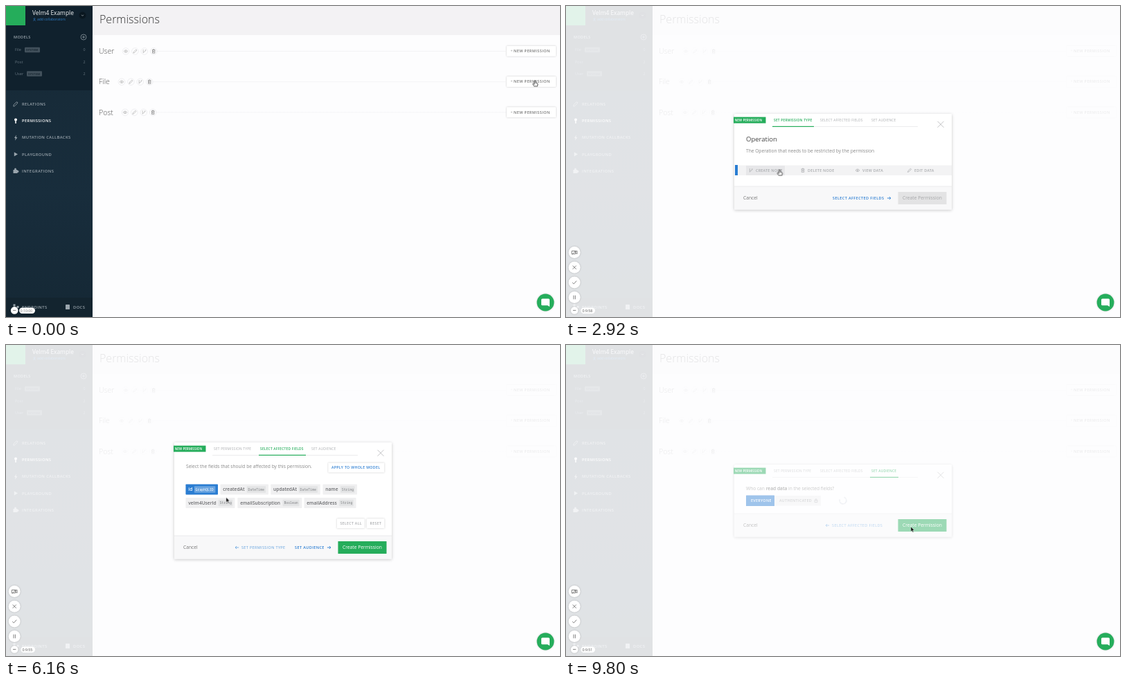
Write an HTML page that moves like this. It is 800 by 450 pixels and loops after 10000 ms.

```html
<!DOCTYPE html>
<html lang="en">
<head>
<meta charset="utf-8">
<title>Permissions</title>
<style>
html, body { margin: 0; width: 100%; height: 100%; overflow: hidden; background: #fdfdfe; }
svg { display: block; width: 800px; height: 450px; font-family: "Open Sans", "Noto Sans", sans-serif; }
text { white-space: pre; }
.b { font-weight: 600; }
.l { font-weight: 300; }
.m { font-family: "Noto Sans Mono", "DejaVu Sans Mono", monospace; }
.card { filter: drop-shadow(0 .6px 1px rgba(0, 0, 0, .22)); }
.modal { filter: drop-shadow(0 1px 2px rgba(0, 0, 0, .22)); }
.turn { transform-origin: 400px 225px; animation: turn 1s linear infinite; }
@keyframes turn { to { transform: rotate(360deg); } }
</style>
</head>
<body>
<svg id="stage" viewBox="0 0 800 450"></svg>
<script>
const GREEN = '#25ad5b', BLUE = '#2a7dd2', GREY = '#a9abae';
const rules = [];

// Keyframes over the ten second loop, times in ms.
function animate(id, steps, ease) {
  const body = steps.map(([t, p]) => `${t / 100}%{${p}}`).join('');
  rules.push(`@keyframes k-${id}{${body}}#${id}{animation:k-${id} 10s ${ease} infinite}`);
}
// Hard switches: on, off, on, ...
function show(id, ...times) {
  const steps = times.map((t, i) => [t, `opacity:${i % 2 ? 0 : 1}`]);
  if (times[0] > 0) steps.unshift([0, 'opacity:0']);
  animate(id, steps, 'step-end');
}
function fade(id, from, to, a, b) {
  animate(id, [[0, `opacity:${a}`], [from, `opacity:${a}`], [to, `opacity:${b}`], [10000, `opacity:${b}`]], 'linear');
}

// y is the middle of the capitals.
const text = (x, y, str, size, fill, cls = '', gap = 0) =>
  `<text x="${x}" y="${y + size * .357}" font-size="${size}" fill="${fill}" class="${cls}" letter-spacing="${gap}">${str}</text>`;
const rect = (x, y, w, h, fill, extra = '') =>
  `<rect x="${x}" y="${y}" width="${w}" height="${h}" fill="${fill}" ${extra}/>`;
const circle = (x, y, r, fill, extra = '') =>
  `<circle cx="${x}" cy="${y}" r="${r}" fill="${fill}" ${extra}/>`;
const line = (d, stroke, w = .7, extra = '') =>
  `<path d="${d}" fill="none" stroke="${stroke}" stroke-width="${w}" ${extra}/>`;
const group = (id, body) => `<g id="${id}">${body}</g>`;
const at = (x, y, body) => `<g transform="translate(${x} ${y})">${body}</g>`;

const icons = {
  eye: 'M-3 0Q0-3.6 3 0Q0 3.6-3 0ZM-.8 0a.8.8 0 1 0 1.6 0a.8.8 0 1 0-1.6 0',
  pen: 'M-2.6 2.6l.6-1.9L1.5-2.6l1.1 1.1L-.8 2Z',
  fork: 'M-1.6 2.7V-2.7M-1.6 1.5Q1.6 1 1.8-1.8M.8-1.8H2.8',
  bin: 'M-2.3-1.9H2.3M-.8-1.9v-.8h1.6v.8M-1.7-1.9V2.7H1.7V-1.9M-.6-.6v2M.6-.6v2',
  right: 'M-2.6 0H2.4M.4-2L2.4 0L.4 2',
  left: 'M2.6 0H-2.4M-.4-2L-2.4 0L-.4 2',
  link: 'M-3.2 3.2l.4-2.4L.8-2.8q1.6-1 2.2.8L-.4 1.8q-1 1.4-2.8 1.4Z',
  cam: 'M-3.8-2.2H1.4V2.2H-3.8ZM1.4-.4L3.8-2.2V2.2L1.4.4M-3.2 3L2.4-3',
  cross: 'M-2.6-2.6L2.6 2.6M2.6-2.6L-2.6 2.6',
  tick: 'M-3 .2L-.9 2.2L3-2.2',
  pause: 'M-1.2-2.8V2.8M1.2-2.8V2.8',
  minus: 'M-2.2 0H2.2',
  lock: 'M-1.9-.3H1.9V2.6H-1.9ZM-1.2-.3V-1.4q1.2-2.2 2.4 0v1.1'
};
const icon = (name, x, y, stroke, w = .7) => at(x, y, line(icons[name], stroke, w));

function sidebar() {
  const dim = '#9aa5ad', faint = '#65747f';
  let s = rect(0, 0, 125, 450, 'url(#side)') + rect(0, 0, 125, 122, '#10212d') + rect(0, 422, 125, 28, '#13242f');
  s += rect(0, 0, 28, 28, GREEN);
  s += text(38, 10, 'Velm4 Example', 8.4, '#f4f6f7') + text(45, 19.5, 'add collaborators', 5, '#2f7fc9');
  s += circle(41, 18.6, 1, 'none', 'stroke="#2f7fc9" stroke-width=".6"') + line('M39.2 21.5q1.8-2.4 3.6 0', '#2f7fc9', .6);
  s += circle(110.5, 13.5, 5, '#0a1720') + line('M109 12.8l1.5 1.5 1.5-1.5', '#b8c1c7', .7);
  s += text(11, 45, 'MODELS', 5.5, dim, 'b', .35);
  s += circle(112, 45, 4, 'none', `stroke="${dim}" stroke-width=".7"`) + line('M110 45h4M112 43v4', dim);
  [['File', 63.5, 27, 0], ['Post', 81, 0, 2], ['User', 98, 30, 2]].forEach(([name, y, tag, n]) => {
    s += text(13, y, name, 5.6, faint) + text(111.5, y, n, 5.4, faint);
    if (tag) s += rect(tag, y - 3.7, 22, 7.4, '#42515c', 'rx="1"') + text(tag + 2, y, 'SYSTEM', 4.3, '#11212c', 'b', .2);
  });
  ['RELATIONS', 'PERMISSIONS', 'MUTATION CALLBACKS', 'PLAYGROUND', 'INTEGRATIONS'].forEach((name, i) => {
    s += text(23, 142 + i * 24.2, name, 5.8, i === 1 ? '#fff' : dim, 'b', .4);
  });
  s += icon('link', 14, 142, dim, .8);
  s += circle(14, 164.5, 2, '#fff') + line('M14 165V170', '#fff', 1.5);
  s += `<path d="M15 186.5l-3 4.6h1.8l-.8 3.6 3.4-4.8h-2z M11.8 211.5l5.2 3-5.2 3z" fill="${dim}"/>`;
  s += rect(10.5, 237, 6, 5, dim) + circle(13.5, 236, 1.5, dim) + circle(17, 239.5, 1.4, dim);
  s += text(23, 435.8, 'ENDPOINTS', 5.8, dim, 'b', .4) + text(97, 435.8, 'DOCS', 5.8, dim, 'b', .4);
  s += rect(10.5, 431.5, 3, 3, dim) + rect(15.5, 434, 3, 3, dim) + rect(86, 432, 6, 7, dim, 'rx=".6"');
  return s;
}

function page() {
  let s = rect(125, 0, 675, 450, '#fdfdfe') + rect(125, 0, 675, 42, '#f3f2f4');
  s += text(135, 18.8, 'Permissions', 16, '#333', 'l');
  [['User', 65.5, 173], ['File', 109.7, 167], ['Post', 153.9, 172]].forEach(([name, y, x]) => {
    s += text(134, y, name, 10.6, '#555', 'l');
    s += line(`M${x + 45} ${y}H722`, '#dedee2', .6, 'stroke-dasharray="1 1"');
    ['eye', 'pen', 'fork', 'bin'].forEach((name, i) => {
      const cx = x + i * 13.4;
      s += circle(cx, y, 4.8, '#fdfdfe', 'stroke="#e4e4e7" stroke-width=".6"') + icon(name, cx, y, i === 3 ? '#777' : '#aaa', .65);
    });
    s += rect(723, y - 7.7, 71, 15, '#fff', 'rx=".8" class="card"');
    s += text(728.4, y - .3, '+', 5.5, '#999') + text(733, y - .3, 'NEW PERMISSION', 5.5, '#777', 'b', .4);
  });
  return s;
}

const tabs = [['SET PERMISSION TYPE', 300, 298, 60], ['SELECT AFFECTED FIELDS', 367, 365, 68], ['SET AUDIENCE', 441, 439, 41]];

function createButton(y, on) {
  return rect(479.5, y + 8, 70, 18, on ? GREEN : '#e3e3e4', 'rx=".6"') +
    text(486, y + 17, 'Create Permission', 6.7, on ? '#fff' : '#a6a7a9');
}

// Body and footer are drawn relative to the top of the panel.
function panel(id, height, active, body, foot) {
  const f = height - 33.5;
  let s = rect(243, 0, 314, height, '#fff', 'rx="1" class="modal"') + rect(243, f, 314, 33.5, '#f8f8f9');
  s += line(`M243 ${f}H557`, '#e6e6e8', .8);
  s += rect(242, 4.6, 46.5, 9, GREEN) + text(243.7, 9, 'NEW PERMISSION', 4.6, '#fff', 'b');
  s += line('M298 18.5H508', '#e4e4e6', .7);
  tabs.forEach(([name, x, ux, w], i) => {
    const on = i === active;
    s += text(x, 9, name, 4.8, on ? GREEN : GREY, on ? 'b' : '', .25);
    if (on) s += rect(ux, 17.8, w, 1.2, GREEN);
  });
  s += line('M536.5 10.8l9 9M545.5 10.8l-9 9', '#b4b5b8', .8);
  s += body + text(256, f + 17, 'Cancel', 6.7, '#777') + foot(f);
  return group(id, at(0, 225.25 - height / 2, s));
}

function typePanel() {
  const ops = [['fork', 267, 'CREATE NODE'], ['bin', 342, 'DELETE NODE'], ['eye', 421, 'VIEW DATA'], ['pen', 496, 'EDIT DATA']];
  const op = ([name, x, label], fill) => icon(name, x, 81.8, fill) + text(x + 7, 81.8, label, 5.4, fill, 'b', .25);
  let s = text(260, 37, 'Operation', 9.5, '#444');
  s += text(260, 54, 'The Operation that needs to be restricted by the permission', 6.65, '#888');
  s += rect(244, 74.5, 313, 14.5, '#f3f3f4') + group('mark', rect(244, 74, 4, 15, BLUE));
  s += group('over1', rect(260, 75, 56, 14, '#e7e7e9')) + group('over3', rect(414, 75, 50, 14, '#e7e7e9'));
  s += ops.map(o => op(o, GREY)).join('');
  s += group('view', rect(414, 74.5, 50, 14.5, BLUE) + op(ops[2], '#fff'));
  return panel('p1', 138.5, 0, s, f =>
    text(385, f + 17, 'SELECT AFFECTED FIELDS', 5.5, BLUE, 'b', .4) + icon('right', 466.5, f + 17, BLUE, .9) + createButton(f, false));
}

function chip(x, y, w, name, tagX, tagW, type, on) {
  return rect(x, y - 7.5, w, 15, on ? BLUE : '#f0f0f1', 'rx=".8"') +
    text(x + 3.8, y, name, 6.65, on ? '#fff' : '#6b6c6f', 'b') +
    rect(tagX, y - 4.7, tagW, 9.4, on ? '#69a4e0' : '#e3e4e5', 'rx=".8"') +
    text(tagX + 1.8, y, type, 4.85, on ? '#fff' : '#808285', 'm');
}

function fieldsPanel() {
  const button = (x, y, w, label, fill, size) =>
    rect(x, y - 7, w, 14, '#fff', 'rx=".6" class="card"') + text(x + 4.6, y, label, size, fill, 'b', .35);
  const id = [259.5, 68, 46.5, 'id', 271.8, 30.6, 'GraphQLID'];
  let s = text(260, 34.8, 'Select the fields that should be affected by this permission.', 6.65, '#888');
  s += button(465.3, 36.6, 81, 'APPLY TO WHOLE MODEL', BLUE, 5.2);
  s += chip(...id) + group('pick', chip(...id, true));
  s += chip(309.5, 68, 69.5, 'createdAt', 347.8, 27.4, 'DateTime') + chip(382.3, 68, 71.5, 'updatedAt', 422.8, 27.4, 'DateTime');
  s += chip(457.5, 68, 49.5, 'name', 483, 20.6, 'String') + chip(259.5, 87.5, 71, 'velm4UserId', 306.6, 20.6, 'String');
  s += chip(334.4, 87.5, 93, 'emailSubscription', 399.6, 24, 'Boolean') + chip(430.5, 87.5, 75, 'emailAddress', 481.2, 20.6, 'String');
  s += button(477.8, 117.3, 40, 'SELECT ALL', GREY, 5.2) + button(521, 117.3, 25.5, 'RESET', GREY, 5.2);
  return panel('p2', 168.5, 1, s, f =>
    icon('left', 333.5, f + 17, '#5f9fdd', .8) + text(340, f + 17, 'SET PERMISSION TYPE', 5.5, '#5f9fdd', '', .35) +
    text(417, f + 17, 'SET AUDIENCE', 5.5, BLUE, 'b', .4) + icon('right', 466.5, f + 17, BLUE, .9) +
    createButton(f, false) + group('ready', createButton(f, true)));
}

function audiencePanel() {
  let s = text(260, 34.8, 'Who can <tspan class="b" fill="#666">read data</tspan> in the selected fields?', 6.65, '#888');
  s += rect(301, 45, 67, 14.5, '#f0f0f1') + rect(260, 44.5, 41, 15.5, BLUE, 'rx=".6"');
  s += text(267, 52.2, 'EVERYONE', 5.3, '#fff', 'b', .35) + text(308, 52.2, 'AUTHENTICATED', 5.3, GREY, 'b', .35);
  s += icon('lock', 361, 52, GREY);
  return panel('p3', 104.5, 2, s, f =>
    icon('left', 377.5, f + 17, '#5f9fdd', .8) + text(384, f + 17, 'SELECT AFFECTED FIELDS', 5.5, '#5f9fdd', '', .4) + createButton(f, true));
}

function recorder() {
  const button = (name, y, r = 8.5) => circle(12.2, y, r, '#fff', 'class="card"') + icon(name, 12.2, y, '#666', .8);
  let s = group('tools', ['cam', 'cross', 'tick', 'pause'].map((n, i) => button(n, 356.6 + i * 21.65)).join(''));
  s += button('minus', 440.4, 5.3);
  const wide = rect(19, 436.6, 23, 8.4, '#fff', 'rx="4.2"') + text(20.6, 440.8, '0:10:00', 5.2, '#777');
  s += group('c0', wide);
  show('c0', 0, 1480);
  for (let i = 1; i < 10; i++) {
    s += group('c' + i, rect(21.5, 436.6, 20.5, 8.4, '#fff', 'rx="4.2"') + text(23.6, 440.8, `0:9:${60 - i}`, 5.2, '#555'));
    const start = i === 1 ? 1480 : i * 1000 + 200;
    i < 9 ? show('c' + i, start, i * 1000 + 1200) : show('c' + i, start);
  }
  return s;
}

function chat() {
  return circle(779, 429, 12.4, GREEN, 'class="card"') +
    '<path d="M774.6 423.5h8.8q1.6 0 1.6 1.6v10l-3-1.8h-7.4q-1.6 0-1.6-1.6v-6.6q0-1.6 1.6-1.6z" fill="#fff"/>';
}

function pointer() {
  const hand = '<path d="M-.9.9Q0-.5.9.9V3.8l2.3.6q1 .3.8 1.5l-.6 2.7H-1.4L-3.4 5.4q.2-1.3 1.3-.6l1.2 1Z" fill="#fff" stroke="#222" stroke-width=".8"/>';
  const arrow = '<path d="M0 0V7L1.6 5.5L2.7 8L3.9 7.5L2.8 5.1H5Z" fill="#111" stroke="#fff" stroke-width=".4"/>';
  return group('pointer', group('hand', hand) + group('arrow', arrow));
}

const spinner = group('wait', `<g class="turn">${line('M405 225A5 5 0 1 1 400 220', '#e6e9ee', 1)}</g>`);
document.getElementById('stage').innerHTML =
  '<defs><linearGradient id="side" x2="0" y2="1"><stop stop-color="#162936"/><stop offset=".6" stop-color="#182d3c"/><stop offset="1" stop-color="#152835"/></linearGradient></defs>' +
  page() + sidebar() +
  group('veil', rect(0, 0, 800, 450, '#fdfdfe', 'opacity=".88"') + typePanel() + fieldsPanel() + group('dim', audiencePanel()) + spinner) +
  recorder() + chat() + pointer();

const path = [
  [0, 764, 107.5], [150, 764, 107.5], [950, 751.7, 65.5], [1450, 751.7, 65.5], [2100, 445, 172],
  [2750, 308.5, 236.5], [3150, 308.5, 236.5], [3650, 440, 237], [4150, 440, 237], [4650, 423, 276], [4880, 423, 276],
  [5280, 290.5, 205.5], [5900, 290.5, 205.5], [6800, 446.7, 291.5], [7150, 446.7, 291.5], [7700, 438, 272],
  [8250, 489.3, 263.5], [8900, 489.3, 263.5], [9300, 498, 263], [10000, 498, 263]
];
animate('pointer', path.map(([t, x, y]) => [t, `transform:translate(${x}px,${y}px)`]), 'ease-in-out');
show('hand', 0, 320, 2620, 4900, 5230, 5960, 6680, 7170, 8170, 8560);
show('arrow', 320, 2620, 4900, 5230, 5960, 6680, 7170, 8170, 8560);
fade('veil', 1480, 1800, 0, 1);
fade('dim', 8560, 8860, 1, .45);
show('p1', 0, 4900);
show('p2', 4900, 7160);
show('p3', 7160);
show('mark', 0, 3750);
show('over1', 2620, 3250);
show('over3', 3500, 3750);
show('view', 3750);
show('pick', 5700);
show('ready', 5700);
show('wait', 8900);
const low = 'opacity:0;transform:translateY(24px)', up = 'opacity:1;transform:translateY(0)';
animate('tools', [[0, low], [300, low], [700, up], [10000, up]], 'ease-out');

const sheet = document.createElement('style');
sheet.textContent = rules.join('\n');
document.head.append(sheet);
</script>
</body>
</html>
```
